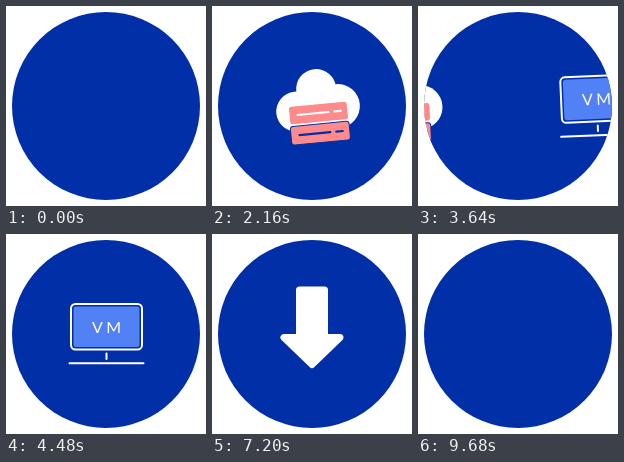
Write an HTML page that moves like this. It is 200 px wide and 200 px high and loops after 10 s.

```html
<!DOCTYPE html>
<html lang="en">
<head>
<meta charset="utf-8">
<title>From servers to virtual machines</title>
<style>
  html, body { margin: 0; height: 100%; overflow: hidden; background: #fff; }
  svg { display: block; width: 100vw; height: 100vh; }
  text { font: 16px Lato, sans-serif; text-anchor: middle; }
</style>
</head>
<body>
<svg viewBox="0 0 200 200">
  <defs>
    <clipPath id="disc"><circle cx="100" cy="100" r="94"/></clipPath>
    <g id="server">
      <rect x="-29.5" y="-9.3" width="59" height="18.6" rx="3" fill="#ff8a8c"/>
      <path d="M-21 0H10M16 0H22.500" fill="none" stroke-width="2.2" stroke-linecap="round"/>
    </g>
  </defs>
  <circle cx="100" cy="100" r="94" fill="#002fa7"/>
  <!-- Items are drawn around their own centre -->
  <g clip-path="url(#disc)">
    <g class="item" stroke="#002fa7">
      <g transform="scale(1.26)">
        <use href="#server" y="-20.300"/>
        <use href="#server"/>
        <use href="#server" y="20.300"/>
      </g>
    </g>
    <g class="item">
      <g fill="#fff">
        <circle cx="-22" cy="3.500" r="20"/>
        <circle cy="-17" r="20"/>
        <circle cx="20" cy="2" r="22"/>
        <rect x="-22" y="-8" width="42" height="32"/>
      </g>
      <use href="#server" y="7" stroke="#fff"/>
      <use href="#server" y="27.300" stroke="#002fa7"/>
    </g>
    <g class="item">
      <g fill="none" stroke="#fff" stroke-width="2" stroke-linecap="round">
        <rect x="-35" y="-30" width="71" height="45.500" rx="4.500"/>
        <path d="M.5 19.500V25M-36.500 29.300H37.500"/>
      </g>
      <rect x="-32.500" y="-27.500" width="66" height="40.500" rx="2.500" fill="#5281f5"/>
      <text x=".5" y="-1" fill="#fff">V M</text>
    </g>
    <g class="item">
      <path d="M-12.500 -37H12.500V10.500H28L0 37.500L-28 10.500H-12.500Z"
            fill="#fff" stroke="#fff" stroke-width="7" stroke-linejoin="round"/>
    </g>
  </g>
</svg>
<script>
const LOOP = 10000, SPACING = 196;
const items = document.querySelectorAll('.item');

// Smooth curve through [time, value] points, flat at both ends
function curve(points) {
  const last = points.length - 1;
  const slope = i => {
    if (i === 0 || i === last) return 0;
    const [a, b] = [points[i - 1], points[i + 1]];
    return (b[1] - a[1]) / (b[0] - a[0]);
  };
  return t => {
    if (t <= points[0][0]) return points[0][1];
    if (t >= points[last][0]) return points[last][1];
    const i = points.findIndex(p => p[0] > t) - 1;
    const [[t0, v0], [t1, v1]] = [points[i], points[i + 1]];
    const d = t1 - t0, s = (t - t0) / d, r = 1 - s;
    return r * r * ((1 + 2 * s) * v0 + s * d * slope(i))
         + s * s * ((3 - 2 * s) * v1 - r * d * slope(i + 1));
  };
}

// A slide to the left: small wind-up, dash, overshoot, settle
const slide = curve([[-750, 0], [-520, 4], [-400, -8], [-260, -57], [-170, -117], [-80, -165],
  [0, -190], [110, -207], [230, -211], [340, -209], [600, -SPACING]]);
const tilt = curve([[-450, 0], [-170, -2.5], [0, -5.5], [120, -6], [340, -4], [640, 0]]);
const slides = [510, 2160, 3810, 5460, 9825];

// The first item swings in from the lower right
const enterX = curve([[0, 142], [150, 80], [330, 6], [500, -14], [620, -13], [950, 0]]);
const enterY = curve([[0, 50], [250, 28], [520, 0]]);

const bob = curve([[0, 0], [200, -7], [440, 4.5], [720, 0]]);
const bobs = [6280, 7000, 8280];

function draw(now) {
  const t = now % LOOP;
  items.forEach((item, i) => {
    const entering = t - slides[i], leaving = t - slides[i + 1];
    const x = (i ? SPACING + slide(entering) : enterX(t)) + slide(leaving);
    const y = i === 0 ? enterY(t)
            : i === 3 ? bobs.reduce((sum, start) => sum + bob(t - start), 0) : 0;
    const angle = tilt(entering) + tilt(leaving);
    item.setAttribute('transform', `translate(${100 + x} ${100 + y}) rotate(${angle})`);
  });
}

const start = performance.now();
function tick() {
  draw(performance.now() - start);
  requestAnimationFrame(tick);
}
tick();
</script>
</body>
</html>
```
